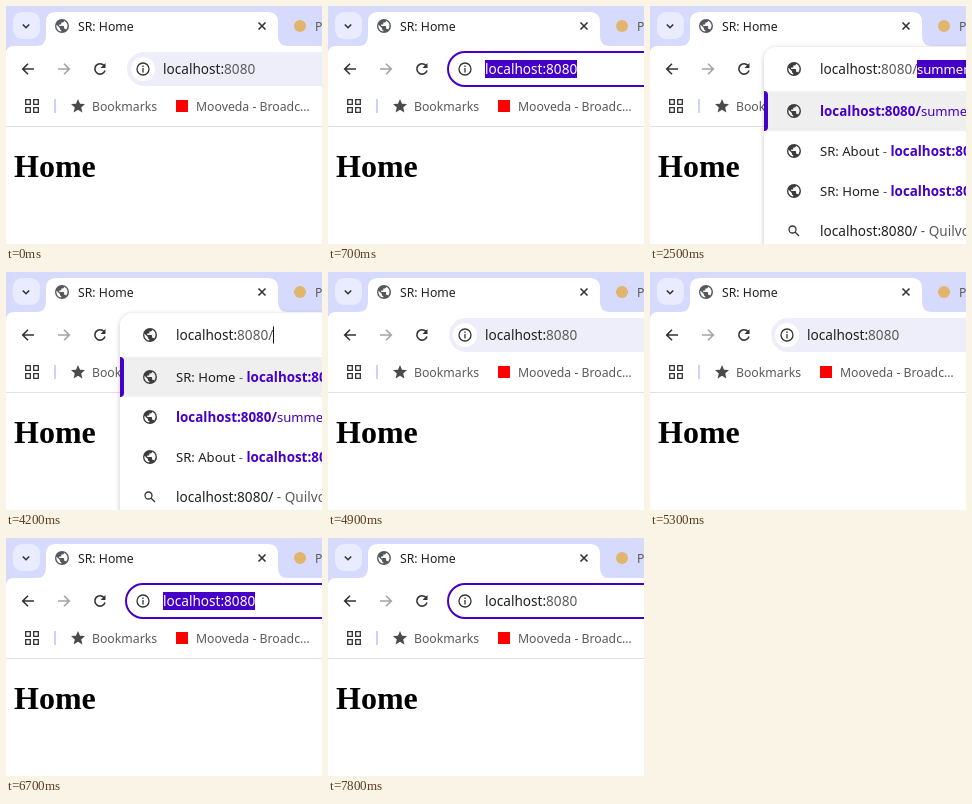
Recreate the animation shown at these times as an HTML page. Size 316 by 238 pixels, loop 8000 ms.

```html
<!DOCTYPE html>
<html lang="en">
<head>
<meta charset="utf-8">
<title>Address bar</title>
<style>
  html, body { margin: 0; width: 100%; height: 100%; overflow: hidden; background: #fff; }
  svg { display: block; width: 316px; height: 238px; font-family: "Noto Sans", "Open Sans", sans-serif; }
  text { white-space: pre; fill: #1f1f1f; }
  .small { font-size: 12.25px; }
  .url { font-size: 13.6px; }
  .row { font-size: 13.1px; }
  .dim { fill: #5a5a5a; }
  .link { fill: #4500c8; }
  .bold { font-weight: 700; font-size: 13.4px; }
  .heading { font: bold 32px "Liberation Serif", serif; fill: #000; }
  .line { fill: none; stroke: #333; stroke-width: 1.6; }
  .thin { stroke-width: 1.3; }
  .accent { fill: #4500c8; }
  .white, .white tspan { fill: #fff; }
</style>
</head>
<body>
<svg viewBox="0 0 316 238">
  <defs>
    <path id="globe" transform="scale(.7) translate(-12 -12)" d="M12 2a10 10 0 1 0 0 20 10 10 0 0 0 0-20zm-1 17.93c-3.95-.49-7-3.85-7-7.93 0-.62.08-1.21.21-1.79L9 15v1c0 1.1.9 2 2 2zm6.9-2.54c-.26-.81-1-1.39-1.9-1.39h-1v-3c0-.55-.45-1-1-1H8v-2h2c.55 0 1-.45 1-1V7h2c1.1 0 2-.9 2-2v-.41a8 8 0 0 1 2.9 12.8z"/>
    <path id="star" fill="#4a4a4a" d="M0-7 L2-2.3 7-1.9 3.2 1.4 4.4 6.4 0 3.7-4.4 6.4-3.2 1.4-7-1.9-2-2.3Z"/>
    <path id="arrow" d="M6 0 H-5 M0-5.3 L-5.3 0 0 5.3"/>
    <filter id="shadow" x="-10%" y="-10%" width="120%" height="120%">
      <feDropShadow dx="0" dy="1" stdDeviation="2.5" flood-opacity=".22"/>
    </filter>
  </defs>

  <!-- tab strip -->
  <rect width="316" height="50" fill="#d6dafd"/>
  <path fill="#fff" d="M0 48 Q0 40 8 40 H30 Q40 40 40 30 V16 Q40 6 50 6 H262 Q272 6 272 16 V30 Q272 40 282 40 H316 V238 H0Z"/>
  <rect x="7" y="6" width="27" height="27" rx="9" fill="#e9ebff"/>
  <path class="line" d="M16.8 18.5 L20 21.7 23.2 18.5"/>
  <use href="#globe" x="56" y="20" fill="#55585c"/>
  <text class="small" x="72" y="24.5">SR: Home</text>
  <path class="line" d="M252.5 16.5 L259.5 23.5 M259.5 16.5 L252.5 23.5"/>
  <circle cx="294" cy="20" r="6" fill="#e3b56c"/>
  <text class="small dim" x="309" y="24.5">P</text>

  <!-- toolbar -->
  <use href="#arrow" x="22" y="63" class="line"/>
  <use href="#arrow" class="line" transform="translate(58 63) scale(-1 1)" opacity=".45"/>
  <path class="line" d="M98 59.5 A5.2 5.2 0 1 0 99 64.5"/>
  <path fill="#333" d="M99.5 57 V62 H94.5Z"/>
  <rect id="pill" x="121" y="46" width="230" height="34" rx="17" fill="#eeeefa"/>
  <circle cx="137" cy="63" r="12" fill="#fff"/>
  <rect id="ring" x="120" y="46" width="230" height="34" rx="17" fill="#fff" stroke="#4500c8" stroke-width="2"/>
  <circle class="line thin" cx="137" cy="63" r="6"/>
  <path class="line thin" d="M137 62 V66.5 M137 59.5 V61"/>
  <rect id="mark" class="accent" x="157" y="54" width="92" height="18"/>
  <text id="address" class="url" x="157" y="67.7">localhost:<tspan class="dim">8080</tspan></text>
  <path id="caret" d="M249.5 54.5 V71.5" stroke="#111"/>

  <!-- bookmarks -->
  <path class="line thin" d="M19.7 93.7 h4.6 v4.6 h-4.6z M27.7 93.7 h4.6 v4.6 h-4.6z M19.7 101.7 h4.6 v4.6 h-4.6z M27.7 101.7 h4.6 v4.6 h-4.6z"/>
  <path d="M49 93 V107" stroke="#ccd1fa" stroke-width="2"/>
  <use href="#star" x="72" y="100"/>
  <text class="small dim" x="86" y="104.7">Bookmarks</text>
  <rect x="170" y="94" width="12" height="12" fill="#f00"/>
  <text class="small dim" x="190" y="104.7">Mooveda - Broadc…</text>
  <path d="M0 120.5 H316" stroke="#e2e2e4"/>

  <!-- page -->
  <text class="heading" x="8" y="171">Home</text>

  <!-- suggestions -->
  <g id="popup">
    <rect x="114" y="41" width="240" height="230" rx="13" fill="#fff" filter="url(#shadow)"/>
    <rect x="114" y="85" width="202" height="40" fill="#efeff0"/>
    <path class="accent" d="M114 85 Q118 85 118 89 V121 Q118 125 114 125Z"/>
    <g fill="#3c3c3c">
      <use href="#globe" x="144" y="63"/>
      <use href="#globe" x="144" y="105"/>
      <use href="#globe" x="144" y="145"/>
      <use href="#globe" x="144" y="185"/>
    </g>
    <circle class="line thin" cx="142.5" cy="223.5" r="3.5"/>
    <path class="line thin" d="M145 226 L149 230"/>
    <text class="url" x="170" y="67.7">localhost:<tspan class="dim">8080/</tspan></text>
    <g id="completion">
      <rect class="accent" x="267" y="54" width="49" height="18"/>
      <text class="row white" x="267" y="67.7">summer</text>
    </g>
    <path id="caret2" d="M267.5 54.5 V71.5" stroke="#111"/>
    <text id="summer" class="row link" x="170"><tspan class="bold">localhost:8080/</tspan>summer</text>
    <text id="about" class="row" x="170">SR: About <tspan class="dim">- </tspan><tspan class="link bold">localhost:8080</tspan></text>
    <text id="home" class="row" x="170">SR: Home <tspan class="dim">- </tspan><tspan class="link bold">localhost:8080</tspan></text>
    <text class="url" x="170" y="229.7">localhost:8080/ <tspan class="dim">- Quilvo</tspan></text>
  </g>
</svg>
<script>
  const $ = id => document.getElementById(id);

  // Start and end times (ms) during which each part is visible.
  const shown = {
    ring: [[600, 2300], [5900, 8000]],
    mark: [[700, 1300], [6000, 6300], [6700, 7300]],
    caret: [[600, 700], [1300, 1900], [5900, 6000], [7300, 7800]],
    popup: [[2300, 4900]],
    completion: [[2300, 4200]],
    caret2: [[4200, 4700]]
  };
  const hover = [[400, 600], [5700, 5900]];
  const within = (spans, t) => spans.some(([from, to]) => t >= from && t < to);

  function draw() {
    const t = performance.now() % 8000;
    for (const id in shown) $(id).style.display = within(shown[id], t) ? "" : "none";
    $("pill").setAttribute("fill", within(hover, t) ? "#e4e5f3" : "#eeeefa");
    $("address").classList.toggle("white", within(shown.mark, t));
    const order = t < 4200 ? ["summer", "about", "home"] : ["home", "summer", "about"];
    order.forEach((id, i) => $(id).setAttribute("y", 109.7 + 40 * i));
    requestAnimationFrame(draw);
  }
  draw();
</script>
</body>
</html>
```
